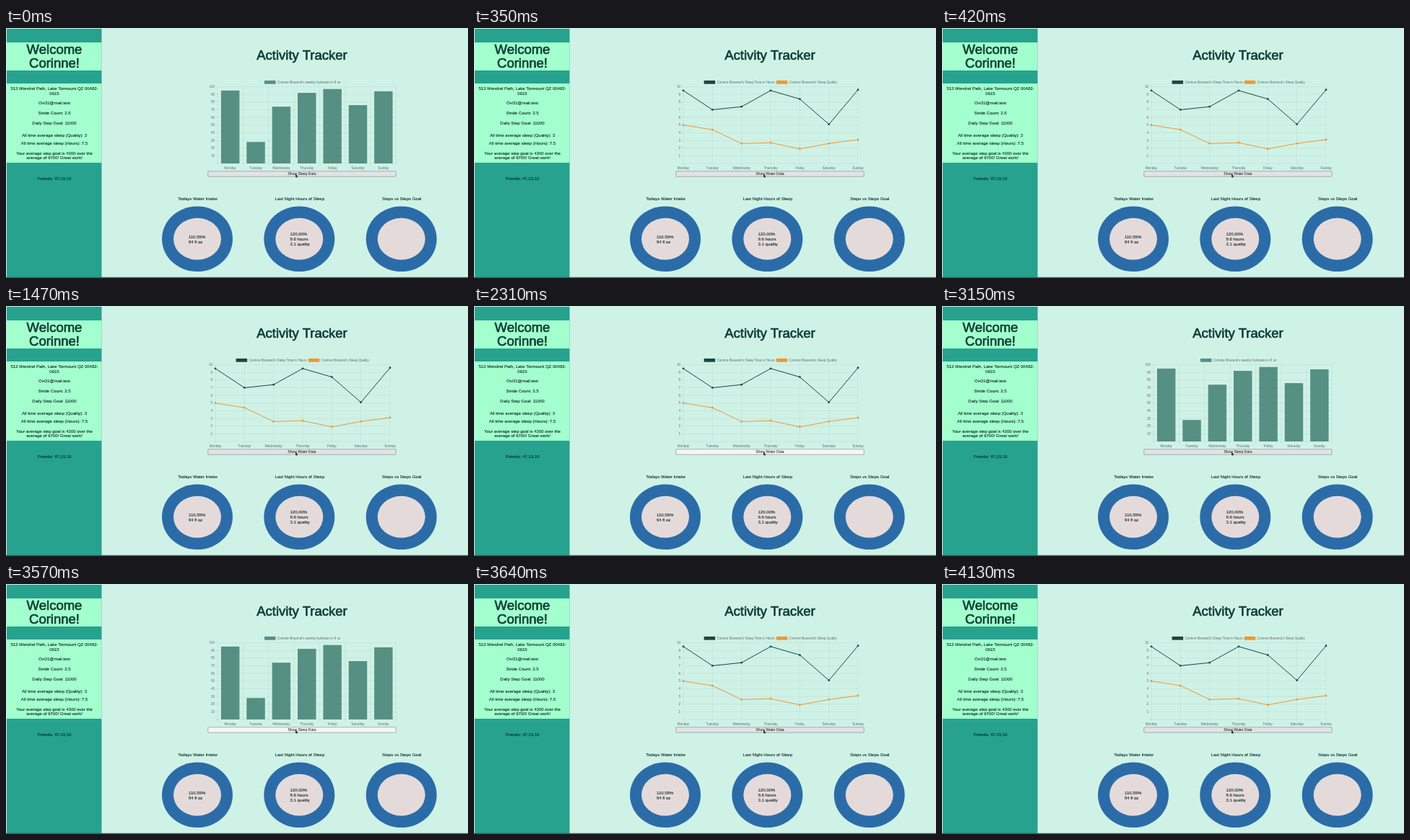
Recreate the animation shown at these times as an HTML page. Size 640 px wide and 347 px high, loop 4.2 s.

```html
<!DOCTYPE html>
<html lang="en">
<head>
<meta charset="utf-8">
<title>Activity Tracker</title>
<style>
  html, body { margin: 0; width: 100%; height: 100%; overflow: hidden; background: #cff2e7; }
  svg { display: block; width: 100%; height: 100%; }
  text { font: 6px "Liberation Sans", Arial, sans-serif; fill: #0b2a25; }
  .body { stroke: #0b2a25; stroke-width: .1px; }
  .title { font-size: 18.5px; fill: #0c3d33; stroke: #0c3d33; stroke-width: .65px; }
  .axis { font-size: 4.6px; fill: #5d6f6a; }
  .button { font-size: 5.05px; fill: #111; }
  .grid { stroke: #000; stroke-opacity: .1; stroke-width: .5; }
</style>
</head>
<body>
<svg id="stage" viewBox="0 0 640 347" preserveAspectRatio="none"></svg>
<script>
const LOOP = 4200;
const PERSON = "Corinne Bravend";
const DAYS = ["Monday", "Tuesday", "Wednesday", "Thursday", "Friday", "Saturday", "Sunday"];
const TOP = 81.5, BASE = 188;
const BAR = "#559083", DARK = "#1a4740", ORANGE = "#f0982f";
const stage = document.getElementById("stage");

function add(parent, tag, attrs, content) {
  const node = document.createElementNS("http://www.w3.org/2000/svg", tag);
  for (const key in attrs) node.setAttribute(key, attrs[key]);
  if (content) node.textContent = content;
  return parent.appendChild(node);
}
const rect = (parent, x, y, width, height, fill) =>
  add(parent, "rect", { x, y, width, height, fill });
const label = (parent, x, y, content, style = "body", anchor = "middle") =>
  add(parent, "text", { x, y, class: style, "text-anchor": anchor }, content);
const gridLine = (parent, x1, y1, x2, y2) =>
  add(parent, "line", { x1, y1, x2, y2, class: "grid" });
const scaleY = (value, max) => BASE - value / max * (BASE - TOP);

function drawSidebar() {
  rect(stage, 1, 1, 131.5, 345, "#26a28f");
  rect(stage, 1, 20, 131.5, 39, "#a3ffce");
  rect(stage, 1, 77, 131.5, 110, "#a3ffce");
  rect(stage, 0, 345.8, 640, 1.2, "#127a22");
  label(stage, 67, 36, "Welcome", "title");
  label(stage, 67, 55, "Corinne!", "title");
  const lines = [
    [86, "513 Wendrel Path, Lake Tormount QZ 00482-"],
    [93, "0615"],
    [106.3, "Ovi31@mail.test"],
    [120, "Stride Count: 2.5"],
    [134, "Daily Step Goal: 11000"],
    [151, "All time average sleep (Quality): 3"],
    [161.8, "All time average sleep (Hours): 7.5"],
    [175.6, "Your average step goal is 4300 over the"],
    [182.3, "average of 6700! Great work!"],
    [210.5, "Friends: 47,19,10"]
  ];
  for (const [y, content] of lines) label(stage, 67, y, content);
}

function drawRing(cx, title, x, y, lines) {
  label(stage, cx + .5, 238.7, title);
  add(stage, "ellipse", { cx, cy: 292.8, rx: 49, ry: 45.3, fill: "#2b6ca8" });
  add(stage, "ellipse", { cx, cy: 292.8, rx: 33, ry: 29, fill: "#e5dada" });
  lines.forEach((content, i) => label(stage, x, y + i * 6.9, content, "body", "start"));
}

function drawAxes(chart, left, right, max, step, columns) {
  for (let value = 0; value <= max; value += step) {
    const y = scaleY(value, max);
    gridLine(chart, left - 3, y, right, y);
    label(chart, left - 4, y + 1.6, value, "axis", "end");
  }
  for (const x of columns) gridLine(chart, x, TOP, x, BASE + 3);
}

function drawLegend(chart, x, color, content) {
  rect(chart, x, 72.9, 15.5, 4.8, color);
  label(chart, x + 17.8, 77, PERSON + "'s " + content, "axis", "start");
}

function drawWaterChart() {
  const chart = add(stage, "g", {});
  const left = 293, step = 35.36, width = step * .72;
  drawAxes(chart, left, left + 7 * step, 100, 10, Array.from({ length: 8 }, (_, i) => left + i * step));
  [95, 28, 74, 92, 97, 76, 94].forEach((value, i) => {
    const center = left + (i + .5) * step, y = scaleY(value, 100);
    rect(chart, center - width / 2, y, width, BASE - y, BAR);
    label(chart, center, 196.4, DAYS[i], "axis");
  });
  drawLegend(chart, 358, BAR, "weekly hydration in fl oz");
  return chart;
}

function drawSleepChart() {
  const chart = add(stage, "g", {});
  const columns = DAYS.map((_, i) => 290 + i * 40.33);
  drawAxes(chart, 290, 532, 10, 1, columns);
  columns.forEach((x, i) => label(chart, x, 196.4, DAYS[i], "axis"));
  const series = [
    [ORANGE, [5, 4.4, 2.6, 2.7, 1.9, 2.6, 3.1]],
    [DARK, [9.5, 7, 7.4, 9.5, 8.4, 5.1, 9.6]]
  ];
  for (const [color, values] of series) {
    const points = values.map((value, i) => [columns[i], scaleY(value, 10)]);
    add(chart, "polyline", { points: points.join(" "), fill: "none", stroke: color, "stroke-width": 1 });
    for (const [cx, cy] of points) add(chart, "circle", { cx, cy, r: 1.4, fill: color });
  }
  drawLegend(chart, 318.6, DARK, "Sleep Time in Hours");
  drawLegend(chart, 418.8, ORANGE, "Sleep Quality");
  return chart;
}

drawSidebar();
label(stage, 410, 43.7, "Activity Tracker", "title");
drawRing(265, "Todays Water Intake", 253, 291.8, ["110.59%", "94 fl oz"]);
drawRing(406.3, "Last Night Hours of Sleep", 393.5, 288.4, ["120.00%", "9.6 hours", "3.1 quality"]);
drawRing(547.7, "Steps vs Steps Goal", 0, 0, []);
const waterChart = drawWaterChart();
const sleepChart = drawSleepChart();
const button = add(stage, "rect", {
  x: 279.8, y: 198.8, width: 260.4, height: 7.4, rx: .4, stroke: "#7d8582", "stroke-width": .6
});
const buttonText = label(stage, 410, 204.4, "", "button");
add(stage, "path", {
  d: "M401 202.6v5l1.2-1 .8 1.7.8-.4-.7-1.6h1.5z", fill: "#111", stroke: "#eee", "stroke-width": .2
});

const CLICKS = [350, 2380, 3640];
const PRESS = 105;

function render(time) {
  const t = time % LOOP;
  const sleeping = CLICKS.filter(click => t >= click).length % 2 === 1;
  const pressed = CLICKS.some(click => t >= click - PRESS && t < click);
  waterChart.setAttribute("visibility", sleeping ? "hidden" : "visible");
  sleepChart.setAttribute("visibility", sleeping ? "visible" : "hidden");
  button.setAttribute("fill", pressed ? "#f5f5f5" : "#e3e2e4");
  buttonText.textContent = sleeping ? "Show Water Data" : "Show Sleep Data";
}

const start = performance.now();
function tick() {
  render(performance.now() - start);
  requestAnimationFrame(tick);
}
tick();
</script>
</body>
</html>
```
